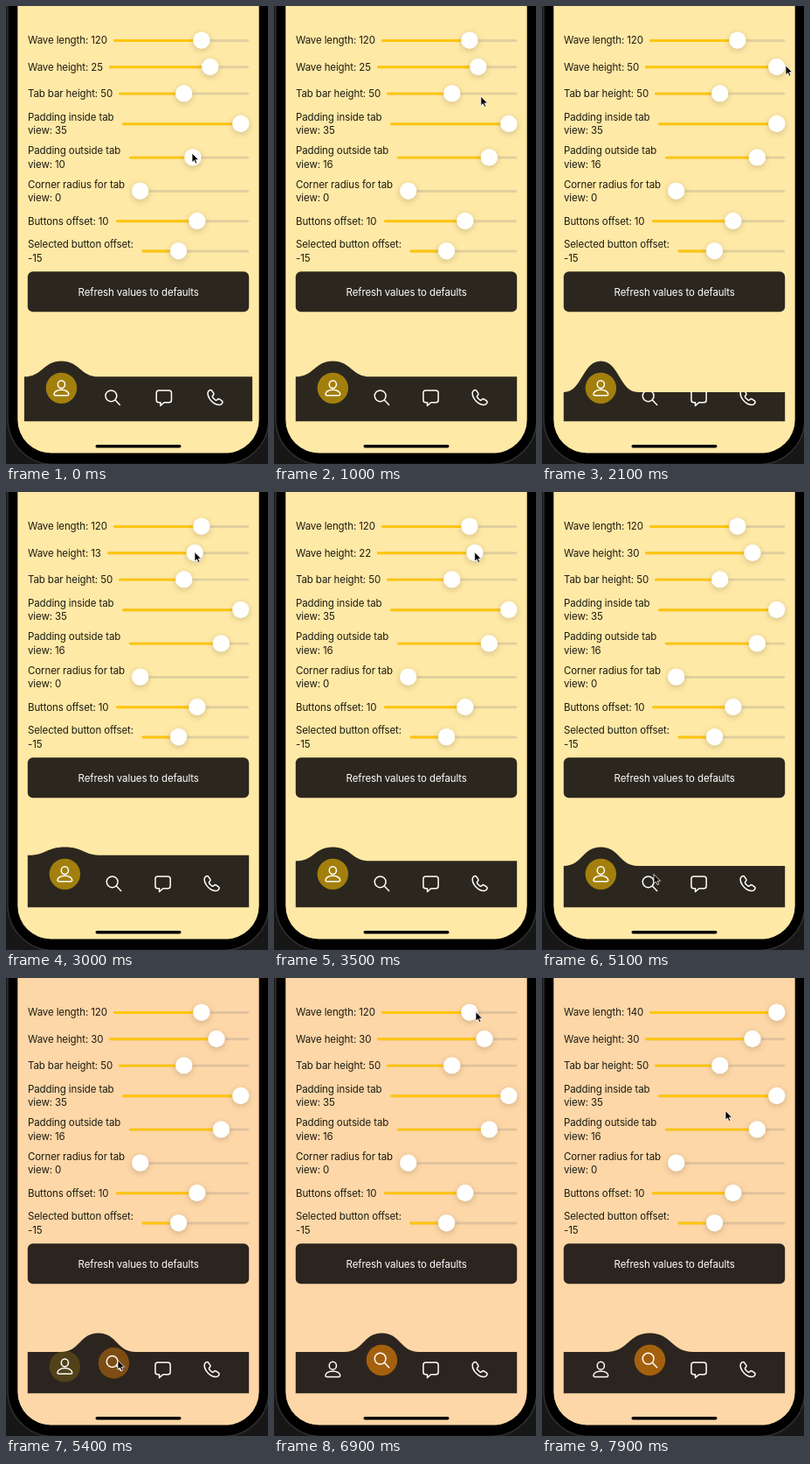
An HTML page for the animation above (8000 ms loop, 300 px wide and 523 px high).

```html
<!DOCTYPE html>
<html lang="en">
<head>
<meta charset="utf-8">
<title>Wave tab bar</title>
<style>
  html, body { margin: 0; height: 100%; overflow: hidden; background: #171717; }
  svg { display: block; width: 300px; height: 523px; }
  text { font: 11.5px Inter, "Open Sans", sans-serif; letter-spacing: -.11px; fill: #1d1a12; }
  .icon { fill: none; stroke: #fff; stroke-width: 1.5; stroke-linecap: round; stroke-linejoin: round; }
  .thumb { fill: #fff; filter: drop-shadow(0 2.5px 3.5px rgba(0, 0, 0, .18)); }
</style>
</head>
<body>
<svg id="stage" viewBox="0 0 300 523">
  <defs><clipPath id="barClip"><path id="clipShape"/></clipPath></defs>
  <rect x="2" y="-100" width="299" height="623.5" rx="52" fill="#000" stroke="#303032" stroke-width="1.5"/>
  <rect id="screen" x="13.3" y="-100" width="276.4" height="610.5" rx="38"/>
  <g id="rows"></g>
  <rect id="refresh" x="24.8" y="303.3" width="253.4" height="46" rx="6"/>
  <text x="151.7" y="331" text-anchor="middle" style="fill:#fff">Refresh values to defaults</text>
  <path id="bar"/>
  <g id="tabs" clip-path="url(#barClip)"></g>
  <rect x="102.5" y="501" width="98" height="3.5" rx="1.75" fill="#000"/>
  <path id="cursor" d="M0 0V10.6L2.5 8.4L4.1 12.1L5.9 11.3L4.3 7.7H7.6Z"
        fill="#000" stroke="#fff" stroke-width=".8" stroke-linejoin="round"/>
</svg>
<script>
const LOOP = 8000, SCALE = .71, THUMB = 9.7, TRACK_END = 278.2;
const $ = id => document.getElementById(id);

function add(parent, tag, attrs, text) {
  const el = document.createElementNS('http://www.w3.org/2000/svg', tag);
  set(el, attrs);
  if (text) el.textContent = text;
  return parent.appendChild(el);
}
function set(el, attrs) {
  for (const k in attrs) el.setAttribute(k, attrs[k]);
}

// Eased value at time t from keys [time, value]
function at(t, keys) {
  if (t <= keys[0][0]) return keys[0][1];
  for (let i = 1; i < keys.length; i++) {
    const [t0, a] = keys[i - 1], [t1, b] = keys[i];
    if (t < t1) {
      const u = (t - t0) / (t1 - t0);
      return a + (b - a) * u * u * (3 - 2 * u);
    }
  }
  return keys[keys.length - 1][1];
}

const padding = [[0, 10.7], [500, 16.2]];
const height = [[1400, 25.2], [1850, 50], [2300, 50], [3000, 13.2], [3200, 8], [3700, 30.3]];
const wavelength = [[6900, 120.2], [7350, 140]];
const selection = [[5150, 0], [5550, 1]];
const path = [
  [0, 213, 168], [500, 244, 168], [700, 244, 168], [1200, 233, 68], [1400, 233, 68],
  [1900, 279, 68], [2300, 279, 68], [3000, 216, 68.5], [3200, 209, 68.5], [3700, 241, 68.5],
  [4250, 136, 451], [4400, 136, 451], [4900, 128, 436.5], [5600, 128, 436.5],
  [6500, 229, 39], [6900, 231, 38.5], [7350, 290, 39], [7500, 290, 39], [7900, 210, 151.5]
];
const pathX = path.map(k => [k[0], k[1]]), pathY = path.map(k => [k[0], k[2]]);

// label, second line, centre y, track start, min, max, value
const rows = [
  ['Wave length: ', null, 39.4, 123, 80, 140, 120],
  ['Wave height: ', null, 69.7, 118, -50, 50, 25],
  ['Tab bar height: ', null, 100.1, 129, 0, 100, 50],
  ['Padding inside tab', 'view: ', 134.7, 133, 0, 35, 35],
  ['Padding outside tab', 'view: ', 173.1, 141, 0, 20, 10],
  ['Corner radius for tab', 'view: ', 211.4, 144, 0, 50, 0],
  ['Buttons offset: ', null, 245.7, 126, -15, 25, 10],
  ['Selected button offset:', '', 279.9, 155.5, -30, 18, -15]
].map(([label, second, y, start, min, max, value]) => {
  const g = $('rows'), two = second !== null;
  const first = add(g, 'text', { x: 25, y: y + (two ? -3.8 : 3.8) }, label);
  const last = two ? add(g, 'text', { x: 25, y: y + 11.7 }) : first;
  const line = { y: y - 1.4, height: 2.9, rx: 1.4 };
  const rest = add(g, 'rect', { ...line, fill: '#787880', 'fill-opacity': .22 });
  const fill = add(g, 'rect', { ...line, fill: '#fec50c' });
  const thumb = add(g, 'circle', { class: 'thumb', cy: y - .2, r: THUMB });
  const row = {
    show(v, x0 = start) {
      const lo = x0 + THUMB, hi = TRACK_END + .3 - THUMB;
      const x = lo + (hi - lo) * (v - min) / (max - min);
      last.textContent = (two ? second : label) + Math.trunc(v);
      set(rest, { x: x0, width: TRACK_END - x0 });
      set(fill, { x: x0, width: x - x0 });
      set(thumb, { cx: x });
    }
  };
  row.show(value);
  return row;
});

const tabs = [
  ['#a3800d', 'M-4.1-4.3a4.1 4.4 0 1 0 8.2 0a4.1 4.4 0 1 0-8.2 0ZM-8.4 7C-8.4 4.2-4.8 1.9 0 1.9S8.4 4.2 8.4 7Q8.4 8.4 7 8.4H-7Q-8.4 8.4-8.4 7Z'],
  ['#a5600e', 'M-8.2-1.7a6.4 6.4 0 1 0 12.8 0a6.4 6.4 0 1 0-12.8 0ZM3 3L8.2 8.4'],
  ['#a3800d', 'M-5.8-8H5.8Q8.6-8 8.6-5.2V3Q8.6 5.8 5.8 5.8H.2L-4 9.4V5.8H-5.8Q-8.6 5.8-8.6 3V-5.2Q-8.6-8-5.8-8Z'],
  ['#a3800d', 'M-8.5-5C-8.5-7-6.5-8.5-5.3-8.5Q-4.3-8.5-3.6-7.4L-1.9-4.8Q-1.2-3.6-2.2-2.6L-3-1.8Q-3.5-1.2-3-.3Q-1.6 1.6.3 3Q1.2 3.5 1.8 3L2.6 2.2Q3.6 1.2 4.8 1.9L7.4 3.6Q8.5 4.3 8.5 5.3C8.5 6.5 7 8.5 5 8.5C-1.5 8.5-8.5 1.5-8.5-5Z']
].map(([color, d]) => {
  const g = add($('tabs'), 'g', {});
  return {
    g,
    disc: add(g, 'circle', { r: 17.7, fill: color }),
    icon: add(g, 'path', { class: 'icon', d })
  };
});

function draw(t) {
  const pad = at(t, padding), h = at(t, height), len = at(t, wavelength), sel = at(t, selection);
  rows[0].show(len);
  rows[1].show(h, h >= 10 && h < 20 ? 116 : 118);
  rows[4].show(pad);

  const orange = t >= 5200, dark = orange ? '#2c251f' : '#2c271e';
  set($('screen'), { fill: orange ? '#fdd7a7' : '#ffe9a6' });
  set($('refresh'), { fill: dark });

  const left = 13.3 + pad * SCALE, right = 289.7 - pad * SCALE;
  const inset = 35 * SCALE + 17.7, first = left + inset;
  const step = (right - inset - first) / 3;
  const mid = first + sel * step, half = len * SCALE / 2, q = half / 2;
  const peak = 405.4, top = peak + h * SCALE;
  const d = `M${left} 474.3V${top}H${Math.max(left, mid - half)}` +
    `C${mid - q} ${top} ${mid - q} ${peak} ${mid} ${peak}` +
    `S${mid + q} ${top} ${mid + half} ${top}H${right}V474.3Z`;
  set($('bar'), { d, fill: dark });
  set($('clipShape'), { d });

  tabs.forEach((tab, i) => {
    const on = Math.max(0, 1 - Math.abs(i - sel));
    set(tab.g, { transform: `translate(${first + i * step} ${447 - 15 * SCALE * on})` });
    set(tab.disc, { opacity: on });
  });
  set($('cursor'), { transform: `translate(${at(t, pathX)} ${at(t, pathY)})` });
}

// The motion advances in steps of 100 ms
const begin = performance.now();
function tick() {
  const t = (performance.now() - begin) % LOOP;
  draw(Math.floor(t / 100) * 100);
  requestAnimationFrame(tick);
}
tick();
</script>
</body>
</html>
```
